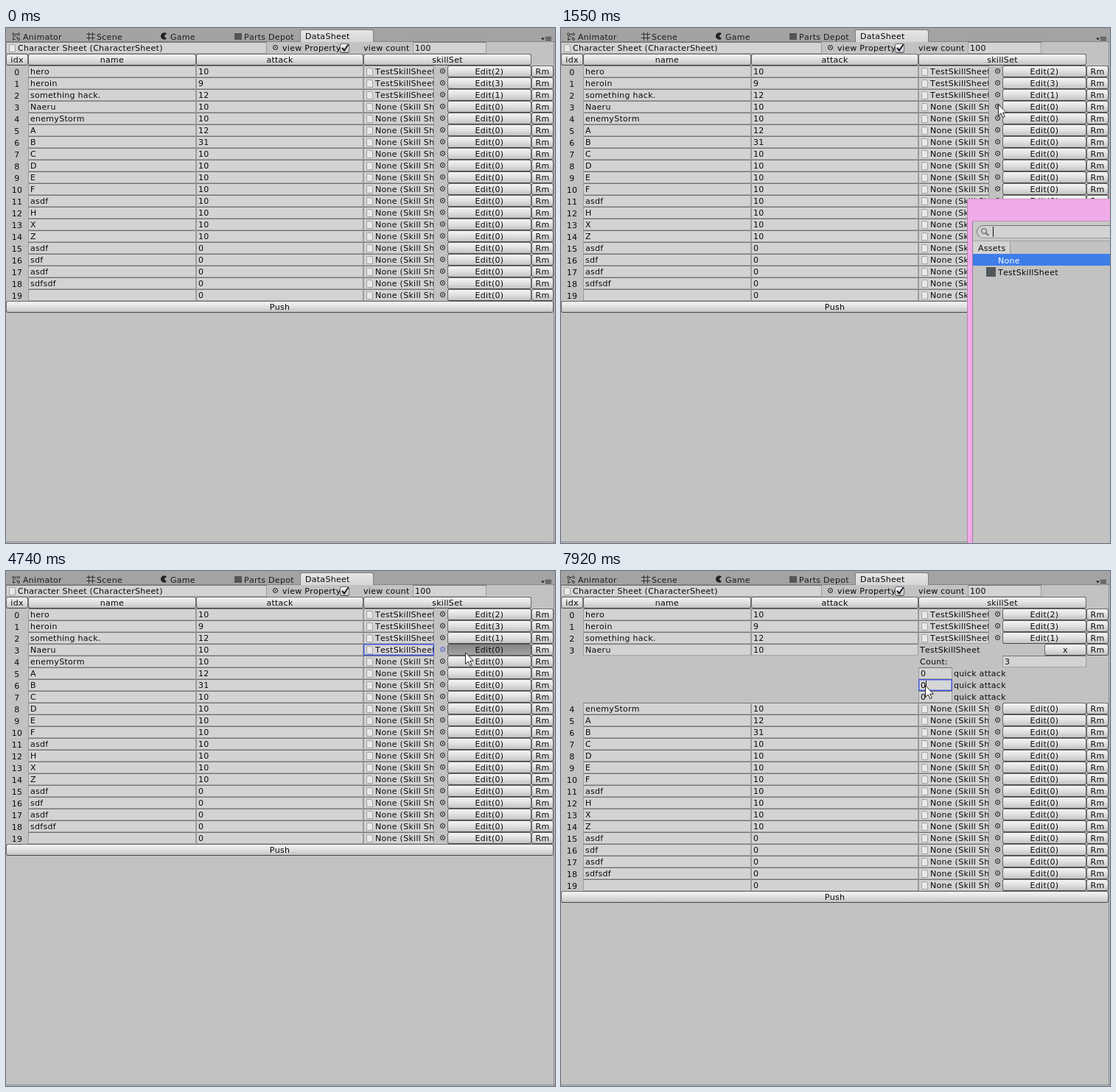
Animation of 745x700 px, one loop 8000 ms. Source, as an HTML page:

```html
<!DOCTYPE html>
<html lang="en">
<head>
<meta charset="utf-8">
<title>Data sheet editor</title>
<style>
html, body { margin: 0; width: 100%; height: 100%; overflow: hidden; background: #c2c2c2; }
#stage { position: relative; width: 745px; height: 700px; overflow: hidden; background: #c2c2c2;
  font: 11px/13px "DejaVu Sans", sans-serif; font-kerning: none; letter-spacing: .28px; color: #0a0a0a; }
#stage div, #stage svg { position: absolute; box-sizing: border-box; }
.t { white-space: pre; height: 13px; }
.c { text-align: center; }
.clip { overflow: hidden; }
.field { background: #d3d3d3; border: 1px solid #9b9b9b; border-top-color: #757575; border-bottom-color: #a5a5a5; }
.ring { background: #d6d6d6; border: 1px solid #3f53d6; box-shadow: inset 0 0 0 1px #8f9be0; }
.btn { border: 1px solid #6a6a6a; border-bottom-color: #454545; border-radius: 3px;
  background: linear-gradient(#f4f4f4, #e2e2e2 45%, #c4c4c4); }
.btn.down { background: linear-gradient(#858585, #a3a3a3); border-color: #555; }
.doc { background: #e8e8e8; border: 1px solid #a2a2a2; border-top-right-radius: 3px; }
.dot { border: 1px solid currentColor; border-radius: 50%;
  background: radial-gradient(circle, currentColor 0 .7px, transparent 1.1px); }
.pick .dot { color: #3f53d6; }
.tabs { background: #a3a3a3; border-bottom: 1px solid #858585; }
.tab { background: linear-gradient(#e6e6e6, #d6d6d6); border: 1px solid #808080; border-bottom: 0; border-radius: 3px 3px 0 0; }
.edge { background: #8a8a8a; }
.caret { background: #111; }
.mark { background: #5f97dc; }
.pink { background: #f0aae8; border-left: 1px solid #b983b3; border-top: 1px solid #d596cd; }
.panel { background: #c2c2c2; border-left: 1px solid #a07a9c; border-top: 1px solid #b594b0; }
.search { background: #d2d2d2; border: 1px solid #777; border-bottom-color: #999; border-radius: 9px; }
.bar { background: #c8c8c8; border-bottom: 1px solid #a2a2a2; }
.assets { background: #d3d3d3; border-right: 1px solid #999; }
.sel { background: #3e7de8; }
.asset { background: #51585c; }
</style>
</head>
<body>
<div id="stage"></div>
<script>
const LOOP = 8000;
const stage = document.getElementById('stage');

const add = (parent, cls, x, y, w, h) => {
  const el = document.createElement('div');
  el.className = cls;
  el.style.cssText = `left:${x}px;top:${y}px;` + (w ? `width:${w}px;` : '') + (h ? `height:${h}px` : '');
  return parent.appendChild(el);
};
const text = (parent, x, base, str, w) => {
  const el = add(parent, w ? 't c' : 't', x, base - 10, w);
  el.textContent = str;
  return el;
};
const svg = (parent, w, h, body) => {
  parent.insertAdjacentHTML('beforeend', `<svg width="${w}" height="${h}" style="left:0;top:0">${body}</svg>`);
  return parent.lastElementChild;
};
const group = (parent, y = 0) => add(parent, '', 0, y);

// Controls fill 16px cells; y is the top of the cell.
const box = (parent, cls, x, y, w) => add(parent, cls, x, y, w, 16);
const button = (parent, x, y, w, label) => {
  const el = box(parent, 'btn', x, y, w);
  text(parent, x, y + 12, label, w);
  return el;
};
const field = (parent, x, y, w, str) => {
  box(parent, 'field', x, y, w);
  return text(parent, x + 3, y + 12, str);
};
const picker = (parent, x, y) => add(parent, 'dot', x, y + 4, 7, 7);
const slot = (parent, str) => {
  box(parent, 'field', 485, 0, 96);
  const focus = box(parent, 'ring', 485, 0, 96);
  add(parent, 'doc', 489, 3, 9, 11);
  const label = text(add(parent, 'clip', 501, 0, 79, 16), 0, 12, str);
  picker(parent, 589, 0);
  focus.style.display = 'none';
  return { label, focus };
};

// Window tabs
add(stage, 'tabs', 0, 0, 745, 19);
add(stage, 'tab', 399, 2, 100, 17);
[['Animator', 23], ['Scene', 123], ['Game', 223], ['Parts Depot', 323]].forEach(([s, x]) => text(stage, x, 16, s).style.color = '#1c1c1c');
text(stage, 406, 15, 'DataSheet');
svg(stage, 745, 19, `
  <g fill="none" stroke="#333">
    <circle cx="10" cy="8.5" r="1.5"/><circle cx="17" cy="8.5" r="1.5"/><circle cx="17" cy="15" r="1.5"/>
    <path d="M11 9.500L16 14M9 15.500H13M10 11V17M12 8.500H15"/>
    <path d="M112.500 6V17M117.500 6V17M109 8.500H121M109 13.500H121"/>
    <path d="M732 12.500H740M732 14.500H740M732 16.500H740"/>
  </g>
  <path fill="#222" d="M214.500 11L218 7.500A4.800 4.800 0 1 0 218 14.500ZM726 13.500H731L728.500 16.500Z"/>
  <rect x="310" y="7" width="10" height="9" fill="#555"/>`);

// Toolbar
box(stage, 'field', 0, 19, 354);
add(stage, 'doc', 4, 22, 9, 11);
text(stage, 16, 31, 'Character Sheet (CharacterSheet)');
picker(stage, 362, 19);
text(stage, 375, 31, 'view Property');
add(stage, 'btn', 453, 21, 13, 13);
svg(stage, 470, 36, '<path d="M456 27L459 30.500L464.500 22.500" fill="none" stroke="#16202c" stroke-width="2"/>');
text(stage, 485, 31, 'view count');
field(stage, 552, 19, 100, '100');

// Column heads
[['idx', 0, 30], ['name', 30, 228], ['attack', 258, 227], ['skillSet', 485, 228]].forEach(([s, x, w]) => button(stage, x, 35, w, s));

// Rows
const names = 'hero,heroin,something hack.,Naeru,enemyStorm,A,B,C,D,E,F,asdf,H,X,Z,asdf,sdf,asdf,sdfsdf,'.split(',');
const attacks = { 1: 9, 2: 12, 5: 12, 6: 31 };
const edits = [2, 3, 1];
const SHEET = 'TestSkillSheet', NONE = 'None (Skill Sheet)';
const tail = group(stage);
let closed, opened, picked, editBtn;

names.forEach((name, i) => {
  const row = group(i > 3 ? tail : stage, 51 + 16 * i);
  text(row, 0, 13, i, 30);
  field(row, 30, 0, 228, name);
  field(row, 258, 0, 227, attacks[i] ?? (i < 15 ? 10 : 0));
  const cell = group(row);
  const obj = slot(cell, i < 3 ? SHEET : NONE);
  const edit = button(cell, 599, 0, 114, `Edit(${edits[i] || 0})`);
  button(row, 713, 0, 30, 'Rm');
  if (i === 3) {
    closed = cell;
    picked = obj;
    editBtn = edit;
    opened = group(row);
  }
});
button(tail, 0, 371, 743, 'Push');

// Unfolded skill list of the fourth row
text(opened, 487, 12, SHEET);
button(opened, 656, 0, 57, 'x');
text(opened, 487, 28, 'Count:');
box(opened, 'field', 599, 16, 114);
const countRing = box(opened, 'ring', 599, 16, 114);
const countMark = add(opened, 'mark', 602, 18, 8, 12);
const count = text(opened, 602, 28, '0');
const countCaret = add(opened, 'caret', 610, 18, 1, 12);
const skills = group(opened);
let skillFocus;
for (let k = 0; k < 3; k++) {
  const y = 32 + 16 * k;
  box(skills, 'field', 485, y, 46);
  if (k === 1) {
    skillFocus = group(skills);
    box(skillFocus, 'ring', 485, y, 46);
    add(skillFocus, 'caret', 495, y + 2, 1, 12);
  }
  text(skills, 488, y + 12, '0');
  text(skills, 533, y + 12, 'quick attack');
}

// Window edges
add(stage, 'edge', 743, 19, 1, 681);
add(stage, 'edge', 0, 698, 745, 1);

// Object chooser
const popup = add(stage, 'pink', 551, 232, 200, 470);
const inner = add(popup, '', -552, -233);
add(inner, 'panel', 558, 262, 200, 440);
add(inner, 'bar', 559, 263, 200, 27);
add(inner, 'search', 564, 268, 200, 18);
svg(inner, 590, 290, '<g fill="none" stroke="#4c4c4c"><circle cx="574" cy="276" r="3.500"/><path d="M576.500 278.500L580 282" stroke-width="1.600"/></g>');
const searchCaret = add(inner, 'caret', 586, 270, 1, 14);
add(inner, 'assets', 559, 290, 51, 17);
text(inner, 566, 303, 'Assets');
const sel = add(inner, 'sel', 559, 307, 200, 16);
const noneItem = text(inner, 593, 320, 'None');
add(inner, 'asset', 577, 325, 13, 13);
const sheetItem = text(inner, 593, 336, SHEET);

// Pointers
const arrow = svg(stage, 14, 21, '<path d="M.5 .8V16.500L4.200 13L6.700 18.700L9.200 17.600L6.700 12.200H11.500Z" fill="#fff" stroke="#111" stroke-width=".9"/>');
const beam = svg(stage, 8, 18, '<path d="M.5 .5H2.500L3.500 1.500L4.500 .5H6.500M3.500 1V16M.5 16.500H2.500L3.500 15.500L4.500 16.500H6.500" fill="none" stroke="#333"/>');

// Each move: first step, last step, step count, bend x, y, end x, y
const moves = [
  [200, 370, 3, 610, 560, 569, 502],
  [600, 850, 4, 533, 250, 569, 84],
  [990, 1220, 4, 578, 86, 593, 103],
  [1870, 2390, 8, 576, 215, 615, 327],
  [2710, 2710, 1, 610, 335, 606, 342],
  [2860, 2860, 1, 606, 338, 606, 333],
  [3510, 3812, 5, 480, 120, 419, 14],
  [3963, 4190, 4, 540, 50, 616, 113],
  [4340, 4340, 1, 618, 112, 620, 112],
  [4510, 4590, 2, 622, 111, 623, 110],
  [5050, 5520, 7, 650, 173, 628, 119],
  [5670, 5670, 1, 627, 118, 626, 118],
  [5820, 5820, 1, 627, 118, 628, 119],
  [7290, 7600, 5, 560, 145, 495, 151],
  [7770, 7770, 1, 495, 154, 495, 156],
  [7920, 7920, 1, 494, 155, 494, 155]
];

const pointer = t => {
  let x = 670, y = 740;
  for (const [t0, t1, n, bx, by, ex, ey] of moves) {
    if (t < t0) break;
    const step = t >= t1 ? n : 1 + Math.floor((t - t0) / (t1 - t0) * (n - 1));
    const u = step / n, v = 1 - u;
    x = v * v * x + 2 * u * v * bx + u * u * ex;
    y = v * v * y + 2 * u * v * by + u * u * ey;
    if (step < n) break;
  }
  return [Math.round(x), Math.round(y)];
};

const show = (el, yes) => { el.style.display = yes ? '' : 'none'; };

const render = t => {
  const on = (a, b = LOOP) => t >= a && t < b;

  show(popup, on(1450, 3888));
  popup.style.opacity = on(1550, 3812) ? 1 : .55;
  const chosen = on(3110);
  sel.style.top = chosen ? '323px' : '307px';
  noneItem.style.color = chosen ? '' : '#fff';
  sheetItem.style.color = chosen ? '#fff' : '';
  show(searchCaret, !chosen);
  picked.label.textContent = chosen ? SHEET : NONE;

  const focused = on(3888);
  show(picked.focus, focused);
  closed.classList.toggle('pick', focused);
  editBtn.classList.toggle('down', on(4740));

  const open = on(4820), filled = on(6300);
  show(closed, !open);
  show(opened, open);
  show(skills, filled);
  tail.style.top = (filled ? 64 : open ? 16 : 0) + 'px';
  show(countRing, on(5670, 7920));
  show(countMark, on(5820, 6300));
  show(countCaret, on(6300, 7920));
  count.textContent = filled ? '3' : '0';
  show(skillFocus, on(7920));

  const [x, y] = pointer(t);
  const typing = on(5520, 5670) || on(5820, 7290) || on(7600, 7920);
  show(arrow, on(200) && !typing);
  show(beam, typing);
  arrow.style.transform = `translate(${x}px,${y}px)`;
  beam.style.transform = `translate(${x - 3}px,${y - 8}px)`;
};

const start = performance.now();
const tick = () => {
  render((performance.now() - start) % LOOP);
  requestAnimationFrame(tick);
};
tick();
</script>
</body>
</html>
```
